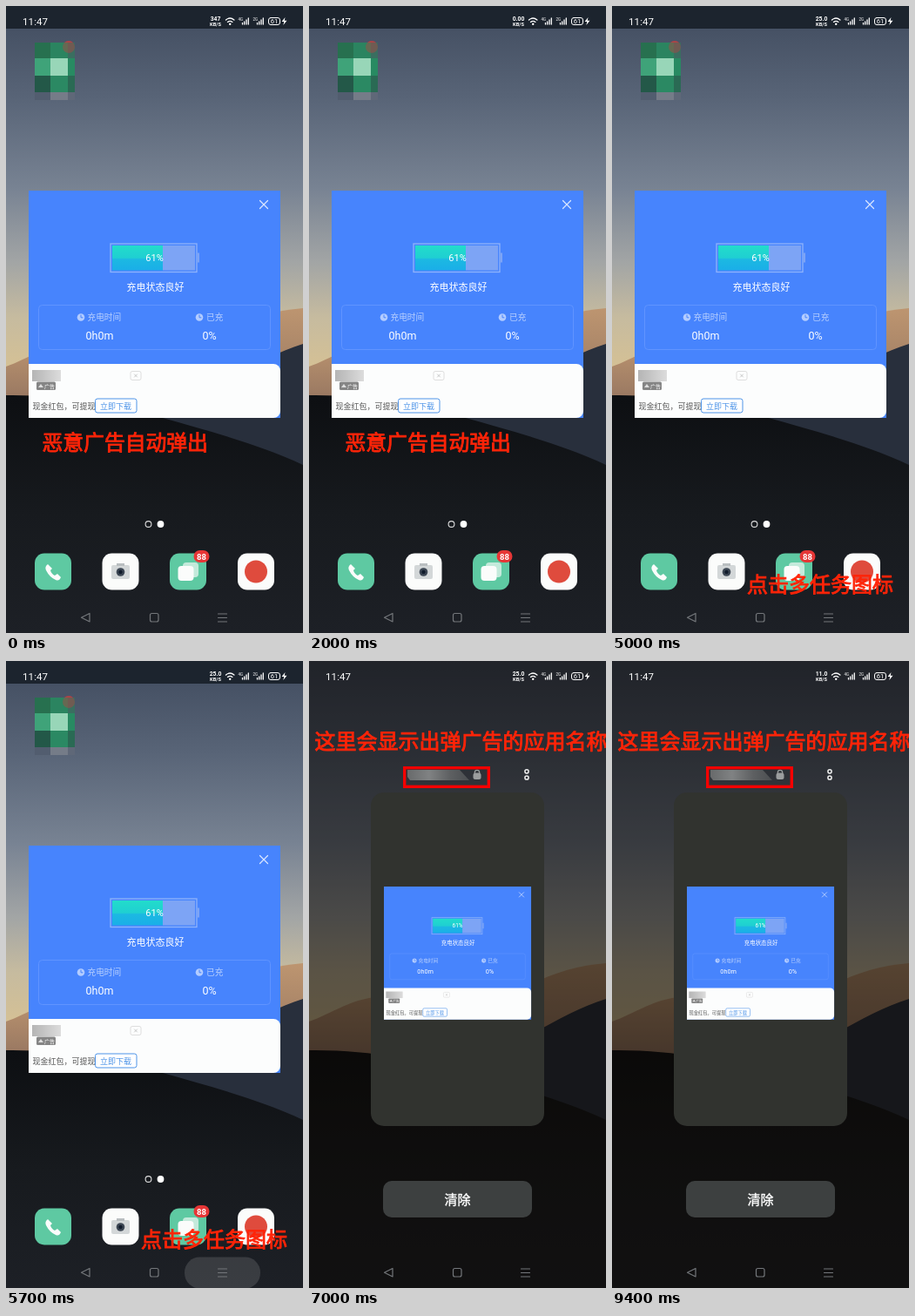
An HTML page that plays this animation: 341 px wide and 720 px high, repeating every 9500 ms.

```html
<!DOCTYPE html>
<html lang="zh-CN">
<head>
<meta charset="utf-8">
<style>
html, body { margin: 0; width: 100%; height: 100%; overflow: hidden; background: #1b1e23 }
svg { display: block; width: 100vw; height: 100vh }
text { font-family: Roboto, "Noto Sans CJK SC", "Noto Sans CJK", sans-serif; fill: #fff }
.mid { text-anchor: middle }
.line { fill: none; stroke-linecap: round; stroke-linejoin: round }
.caption { font-size: 24px; fill: #ff2408; stroke: #ff2408; stroke-width: .9 }
</style>
</head>
<body>
<svg viewBox="0 0 341 720" preserveAspectRatio="none">
  <defs>
    <linearGradient id="sky" x2="0" y2="1">
      <stop stop-color="#404b5e"/><stop offset=".25" stop-color="#586477"/>
      <stop offset=".5" stop-color="#788393"/><stop offset=".7" stop-color="#a2a5a5"/>
      <stop offset=".85" stop-color="#c6bb9f"/><stop offset="1" stop-color="#d6c194"/>
    </linearGradient>
    <linearGradient id="sand" x2="0" y2="1">
      <stop stop-color="#bd9570"/><stop offset="1" stop-color="#86695a"/>
    </linearGradient>
    <linearGradient id="dark" x2="0" y2="1">
      <stop stop-color="#0d0f12"/><stop offset=".5" stop-color="#171a1e"/><stop offset="1" stop-color="#1d2026"/>
    </linearGradient>
    <linearGradient id="charge" x2="0" y2="1">
      <stop stop-color="#22dccb"/><stop offset=".5" stop-color="#1fcfd2"/>
      <stop offset=".55" stop-color="#1cb9e2"/><stop offset="1" stop-color="#1aaee8"/>
    </linearGradient>
    <linearGradient id="smear">
      <stop stop-color="#b5b5b5"/><stop offset=".4" stop-color="#c4c4c4"/><stop offset="1" stop-color="#dcdcdc"/>
    </linearGradient>
    <linearGradient id="veil">
      <stop stop-color="#686a6b"/><stop offset=".35" stop-color="#808283"/>
      <stop offset=".7" stop-color="#5d5f61"/><stop offset="1" stop-color="#4b4e51"/>
    </linearGradient>

    <g id="popup">
      <path fill="#4784fd" d="M26 212h289v261H26z"/>
      <path class="line" stroke="#dbe7ff" stroke-width="1.2" d="M291.500 223.500l9 9m0-9l-9 9"/>
      <rect x="120" y="273" width="99" height="32.500" fill="none" stroke="#8fb3fb" stroke-width="1.300"/>
      <path fill="#7da4f5" d="M180 275h37v28.500h-37zM219.500 283.500h2.500v11h-2.500z"/>
      <path fill="url(#charge)" d="M122 275h58v28.500h-58z"/>
      <text class="mid" x="170.500" y="293" font-size="11">61%</text>
      <text class="mid" x="171.500" y="326.500" font-size="11">充电状态良好</text>
      <rect x="37.500" y="343.500" width="266" height="51" rx="4" fill="none" stroke="#6094ff"/>
      <g fill="#b3ccff"><circle cx="86" cy="357.500" r="4.300"/><circle cx="222" cy="357.500" r="4.300"/></g>
      <path class="line" stroke="#4784fd" d="M86 355v2.800h2M222 355v2.800h2"/>
      <g font-size="9.700" fill-opacity=".62">
        <text x="93.500" y="361">充电时间</text><text x="230" y="361">已充</text>
      </g>
      <g class="mid" font-size="12.500">
        <text x="107.500" y="382.500">0h0m</text><text x="233.500" y="382.500">0%</text>
      </g>
      <path fill="#fcfdfd" d="M26 411h281a8 8 0 0 1 8 8v46a8 8 0 0 1-8 8H26z"/>
      <path fill="url(#smear)" d="M30 418h33v13H30z"/>
      <rect x="35" y="431.500" width="22" height="9.500" rx="1.500" fill="#858585"/>
      <path fill="#ddd" d="M37 438l3-4 3 4z"/>
      <text x="44" y="439" font-size="6">广告</text>
      <rect x="143" y="419.500" width="12" height="10" rx="2" fill="none" stroke="#dedede"/>
      <path class="line" stroke="#bbb" stroke-width=".8" d="M147.500 423l3 3m0-3l-3 3"/>
      <text x="30.500" y="463" font-size="9" style="fill:#555">现金红包，可提现</text>
      <rect x="102.500" y="451" width="47.500" height="16" rx="2.500" fill="#fff" stroke="#4c93e8"/>
      <text class="mid" x="126" y="462.500" font-size="9" style="fill:#4c93e8">立即下载</text>
    </g>
  </defs>

  <!-- wallpaper -->
  <path fill="url(#sky)" d="M0 0h341v420H0z"/>
  <path fill="url(#sand)" d="M150 440C220 385 275 352 341 347v150H150z"/>
  <path fill="url(#sand)" d="M0 414C25 406 50 385 90 385s90 50 150 100H0z"/>
  <path fill="#282f3c" d="M130 490C230 450 285 405 341 388v160H130z"/>
  <path fill="url(#dark)" d="M0 447C70 446 130 459 180 473S295 505 341 527v193H0z"/>

  <g id="home">
    <path fill="#1c242e" d="M0 0h341v26H0z"/>
    <g id="mosaic"></g>
    <use href="#popup"/>
    <circle cx="163.500" cy="595" r="3.400" fill="none" stroke="#ddd" stroke-width="1.100"/>
    <circle cx="177.500" cy="595" r="3.900" fill="#fff"/>
    <g fill="#5ec9a2">
      <rect x="33" y="628.500" width="42" height="42" rx="11"/>
      <rect x="188" y="628.500" width="42" height="42" rx="11"/>
    </g>
    <g fill="#fbfcfb">
      <rect x="110.500" y="628.500" width="42" height="42" rx="11"/>
      <rect x="266" y="628.500" width="42" height="42" rx="11"/>
      <path d="M48 641q-4 3-2 7 4 8 11 11 4 2 6-3l-4-4-3 2q-4-2-5-6l2-2z"/>
      <rect x="203" y="639" width="18" height="17" rx="4" opacity=".65"/>
      <rect x="197.500" y="643" width="18" height="17" rx="4"/>
    </g>
    <rect x="121" y="642" width="21" height="16" rx="2" fill="#d3d7d8"/>
    <path fill="#b9bec0" d="M127 640h9v3h-9z"/>
    <circle cx="131.500" cy="650" r="4.800" fill="#3c4653"/><circle cx="131.500" cy="650" r="2.300" fill="#111c2c"/>
    <circle cx="287" cy="649.500" r="13" fill="#df4b3d"/>
    <rect x="215.500" y="625" width="18" height="14" rx="7" fill="#e63636"/>
    <text class="mid" x="224.500" y="635.500" font-size="9.500" font-weight="700">88</text>
  </g>

  <g id="recents">
    <path fill="#0a0703" opacity=".57" d="M0 0h341v720H0z"/>
    <rect x="71" y="151" width="199" height="383" rx="15" fill="#31332f"/>
    <use href="#popup" transform="translate(86 259) scale(.585) translate(-26 -212)"/>
    <g fill="none" stroke="#eee" stroke-width="1.500"><circle cx="250" cy="126.800" r="2.100"/><circle cx="250" cy="134" r="2.100"/></g>
    <rect x="85" y="597" width="171" height="42" rx="10" fill="#3d4040"/>
    <text class="mid" x="170.500" y="623.500" font-size="15" stroke="#fff" stroke-width=".4">清除</text>
    <path id="name" fill="url(#veil)" d="M113 125h60l11 12h-68l-3-4z"/>
    <g id="lock">
      <rect x="-4.500" y="-2" width="9" height="7.500" rx="2.500" fill="#9b9d9e"/>
      <path class="line" stroke="#9b9d9e" stroke-width="1.300" d="M-2.700-1v-1.500a2.700 2.700 0 0 1 5.400 0V-1"/>
    </g>
    <rect id="frame" x="109.700" y="122.700" width="96.600" height="21.600" fill="none" stroke="#f60000" stroke-width="3.400"/>
  </g>

  <!-- status bar -->
  <text x="19" y="22" font-size="11.500" letter-spacing=".1">11:47</text>
  <g class="mid" font-weight="700">
    <text id="speed" x="240.500" y="17.300" font-size="6.800"></text><text x="240.500" y="23.300" font-size="5.700">KB/S</text>
  </g>
  <g class="line" stroke="#fff" stroke-width="1.300">
    <path d="M252.500 16q4.700-4 9.400 0M254.500 18.400q2.700-2.200 5.400 0"/>
    <path d="M271.500 21v-1.500M273.700 21v-3M276 21v-5M278.300 21v-7M288.500 21v-1.500M290.700 21v-3M293 21v-5M295.300 21v-7"/>
    <rect x="301.500" y="13.500" width="13" height="8" rx="2.500" stroke-width="1"/>
  </g>
  <circle cx="257.200" cy="20.700" r="1.200" fill="#fff"/>
  <text x="266.500" y="16.500" font-size="4.500">4G</text><text x="283.500" y="16.500" font-size="4.500">2G</text>
  <text class="mid" x="308" y="20.300" font-size="7.500">61</text>
  <path fill="#fff" d="M320.500 13l-4 5h2.800l-1 4 4.200-5.300h-2.800z"/>

  <!-- navigation bar -->
  <rect id="press" x="205" y="684.500" width="87" height="36" rx="17.500" fill="#fff"/>
  <g class="line" stroke="#74777b" stroke-width="1.200">
    <path d="M96 697.500v9.500l-9.500-4.700zM243.500 698h10M243.500 702.500h10M243.500 707h10"/>
    <rect x="165.500" y="697.500" width="9.500" height="9.500" rx="2"/>
  </g>

  <text id="cap1" class="caption" x="41.500" y="509.500" style="font-size:23.800px">恶意广告自动弹出</text>
  <text id="cap2" class="caption" x="155" y="673">点击多任务图标</text>
  <text id="cap3" class="caption" x="6.500" y="101">这里会显示出弹广告的应用名称</text>
</svg>
<script>
const $ = id => document.getElementById(id);
const LOOP = 9500, CAPTION = 4500, OPEN = 5800, NAMED = 5900;

// Pixelated app icon
const xs = [33, 51, 71, 79], ys = [42, 60, 80, 99, 108];
const tones = [
  ["#27704f", "#2b8460", "#3a6e60"],
  ["#3fa379", "#98d6b8", "#288a62"],
  ["#235848", "#2b8963", "#2a6a54"],
  ["#525d6f", "#757c88", "#5f6878"]
];
$("mosaic").innerHTML = '<circle cx="72" cy="47" r="7" fill="#a0484c"/>' +
  tones.map((row, r) => row.map((c, i) =>
    `<path fill="${c}" d="M${xs[i]} ${ys[r]}H${xs[i + 1]}V${ys[r + 1]}H${xs[i]}z"/>`).join("")).join("") +
  '<circle cx="72" cy="47" r="7" fill="#c23e3e" opacity=".4"/>';

const show = (id, on) => $(id).style.display = on ? "" : "none";
const ramp = (t, a, b) => Math.min(1, Math.max(0, (t - a) / (b - a)));

function draw() {
  const t = performance.now() % LOOP, named = t >= NAMED;
  show("home", t < OPEN);
  show("recents", t >= OPEN);
  show("cap1", t < CAPTION);
  show("cap2", t >= CAPTION && t < OPEN);
  for (const id of ["cap3", "name", "frame"]) show(id, named);
  $("lock").setAttribute("transform", `translate(${named ? 193 : 121.5} 130.500)`);
  $("speed").textContent = t < 900 ? "347" : t < 4900 ? "0.00" : t < 8900 ? "25.0" : "11.0";
  const press = t < OPEN ? .13 * ramp(t, 5450, 5650) : .04 * (1 - ramp(t, OPEN, 6200));
  $("press").setAttribute("opacity", press);
  requestAnimationFrame(draw);
}
draw();
</script>
</body>
</html>
```
